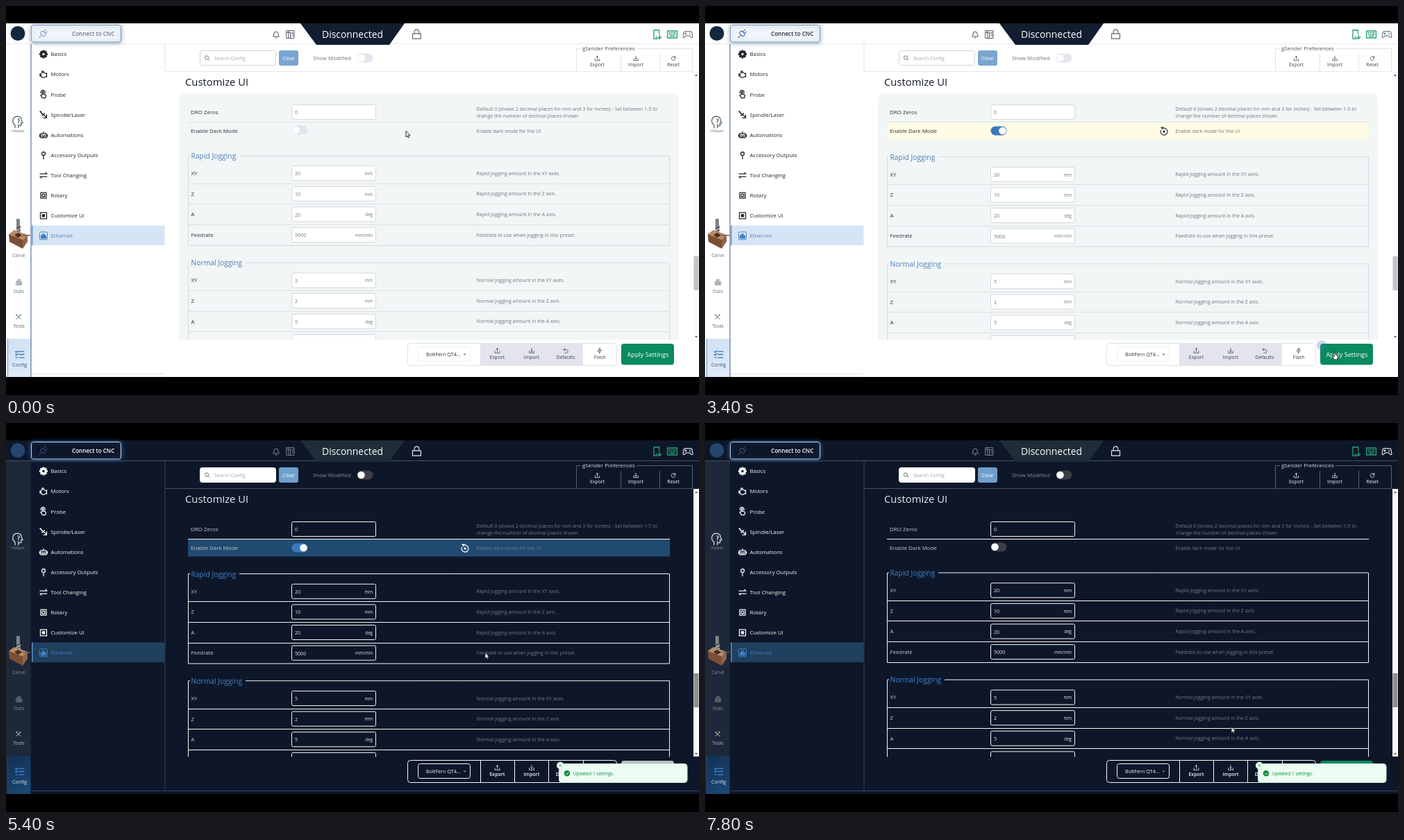
An HTML page with a canvas for the animation above (8 s loop, 998 by 561 pixels).

```html
<!DOCTYPE html>
<html lang="en">
<head>
<meta charset="utf-8">
<title>Settings: dark mode</title>
<style>
html, body { margin: 0; width: 100%; height: 100%; overflow: hidden; background: #000; }
canvas { display: block; }
</style>
</head>
<body>
<canvas id="stage" width="998" height="561"></canvas>
<script>
const ctx = document.getElementById('stage').getContext('2d');
const LOOP = 8000, STEP = 200;
const TOGGLE_ON = 1800, APPLY = 3600, TOGGLE_OFF = 7000;

const LIGHT = {
  bg: '#ffffff', nav: '#ffffff', navLine: '#3d5c8c', line: '#dde1e6', frame: '#d5dbe2', panel: '#f2f6f6',
  text: '#2b3038', side: '#20252c', dim: '#6b7280', help: '#70767e', title: '#111827', legend: '#4a7db8',
  input: '#ffffff', inputLine: '#d3d8df', value: '#6b7280', active: '#d5e5f6', activeText: '#5a83b3',
  row: '#fefce4', trap: '#121d30', off: '#e3e5ee', seg: '#e3e4ed', icon: '#3c4350', logo: '#14283f',
  track: '#fafafa', thumb: '#c3c3c3', connect: '#f0f5fb', connectLine: '#7d9dc2', prefs: '#dfe3e8', config: '#3b74b5'
};
const DARK = {
  bg: '#0e1729', nav: '#1d293a', navLine: '#101a2c', line: '#f4f6f8', frame: '#f4f6f8', panel: '#0e1729',
  text: '#c3c8d0', side: '#f4f6f8', dim: '#868d99', help: '#737a86', title: '#e8ebef', legend: '#3f84cc',
  input: '#0e1729', inputLine: '#f4f6f8', value: '#e8ebef', active: '#20405f', activeText: '#3f7fc4',
  row: '#204a70', trap: '#1e2d37', off: '#3c3e46', seg: '#0e1729', icon: '#f4f6f8', logo: '#24466e',
  track: '#f8f8f8', thumb: '#8f8f8f', connect: '#0e1729', connectLine: '#c4d3e6', prefs: '#566070', config: '#3f84cc'
};

// Icon outlines on a 24 unit grid
const ICONS = {
  bell: 'M6 9a6 6 0 0 1 12 0c0 6 3 7 3 8H3c0-1 3-2 3-8M10 21h4',
  lock: 'M3 11h18v11H3zM7 11V7a5 5 0 0 1 10 0v4',
  map: 'M2 2h20v20H2zM2 7h10M7 2v20M12 7v15M15 6l5 5M20 6l-5 5M16 15h6',
  up: 'M3 14v7h18v-7M12 16V3M8 7l4-4 4 4',
  down: 'M3 14v7h18v-7M12 3v13M8 12l4 4 4-4',
  reset: 'M20 13a8 8 0 1 1-3-7l3 3M20 3v6h-6',
  undo: 'M9 13L4 8l5-5M4 8h10a6 6 0 0 1 0 13h-5',
  bolt: 'M13 2L4 14h7l-1 8 9-12h-7z',
  search: 'M18 10.5a7.5 7.5 0 1 1-15 0a7.5 7.5 0 0 1 15 0M16 16l6 6',
  plug: 'M2 22l5-5M6 12l6 6c4 1 7-2 6-6l-6-6c-4-1-7 2-6 6M14 7l5-5M18 11l4-4',
  swap: 'M2 8h20l-4-4M22 16H2l4 4',
  list: 'M2 5l2 2 4-4M11 5h12M2 12l2 2 4-4M11 12h12M3 20h3M11 20h12',
  tools: 'M4 4l16 16M20 4L4 20M3 7l4-4M17 3l4 4',
  pad: 'M7 5h10a5 5 0 0 1 5 5l1 7c0 3-3 3-4 1l-3-3H8l-3 3c-1 2-4 2-4-1l1-7a5 5 0 0 1 5-5M7 8v4M5 10h4M16 9v1M18 11v1',
  keyboard: 'M1 4h22v16H1zM5 8h2M10 8h2M15 8h4M5 12h2M10 12h2M15 12h4M7 16h10',
  phone: 'M16 10V2H4v20h9M9 18h2M17 13v9M14 19l3 3 4-4',
  head: 'M7 23v-5c-6-4-6-15 4-16c7 0 8 5 8 8l2 4h-3v5h-5v4M12 7c3-1 4 3 1 4v2M13 16v1',
  stats: 'M3 21V11h5v10zM10 21V7h5v14zM17 21v-9h5v9zM6 7l5-4h4l5 4',
  engine: 'M6 7h9l3 3h3v8h-3l-3 3H8l-3-4H2M2 10v7M5 10v5M10 3v4M7 3h6M21 8v12',
  finger: 'M9 12V4a2 2 0 0 1 3 0v7l6 2c2 1 1 6-1 9H9l-5-8zM5 8a6 6 0 1 1 11 0',
  laser: 'M2 3l10 9M12 12l3-4M12 12l-4 3M14 13l7 7M21 12v9h-9M4 2l3 8',
  robot: 'M4 8h16v12H4zM12 8V3M1 11v6M23 11v6M8 13h2M14 13h2M8 17h8',
  pin: 'M17 8a5 5 0 1 1-10 0a5 5 0 0 1 10 0M12 13v10',
  rotate: 'M4 4h5M4 4v5M20 4h-5M20 4v5M4 20h5M4 20v-5M20 20h-5M20 20v-5M16 12a4 4 0 1 1-8 0a4 4 0 0 1 8 0M9 4h6M9 20h6M4 9v6M20 9v6',
  panel: 'M3 3h18v18H3zM8 12h8M12 8v8M9 9l6 6M15 9l-6 6'
};
for (const key in ICONS) ICONS[key] = new Path2D(ICONS[key]);

const MENU = [
  ['Basics', 'gear'], ['Motors', 'engine'], ['Probe', 'finger'], ['Spindle/Laser', 'laser'],
  ['Automations', 'robot'], ['Accessory Outputs', 'pin'], ['Tool Changing', 'swap'],
  ['Rotary', 'rotate'], ['Customize UI', 'panel'], ['Ethernet', 'port']
];

// time, x, y of the pointer tip
const PATH = [
  [0, 576, 180], [200, 590, 190], [800, 907, 499], [1000, 885, 470], [1600, 424, 180], [1800, 424, 180],
  [2200, 535, 214], [2400, 560, 230], [3200, 907, 499], [4800, 907, 499],
  [5400, 690, 331], [5800, 620, 300], [6600, 423, 180], [7000, 423, 180], [7800, 758, 438]
];

function rect(x, y, w, h, fill) {
  ctx.fillStyle = fill;
  ctx.fillRect(x, y, w, h);
}

function box(x, y, w, h, r, fill, stroke, width = 1) {
  ctx.beginPath();
  ctx.roundRect(x, y, w, h, r);
  if (fill) { ctx.fillStyle = fill; ctx.fill(); }
  if (stroke) { ctx.strokeStyle = stroke; ctx.lineWidth = width; ctx.stroke(); }
}

function dot(x, y, r, fill, stroke) {
  box(x - r, y - r, 2 * r, 2 * r, r, fill, stroke, 0.8);
}

function poly(points, fill, stroke, width = 1) {
  ctx.beginPath();
  points.forEach(([x, y]) => ctx.lineTo(x, y));
  ctx.closePath();
  if (fill) { ctx.fillStyle = fill; ctx.fill(); }
  if (stroke) { ctx.strokeStyle = stroke; ctx.lineWidth = width; ctx.stroke(); }
}

// y is the middle of the line of text
function text(str, x, y, size, color, align = 'left', weight = 400) {
  ctx.font = `${weight} ${size}px "Open Sans", "Noto Sans", sans-serif`;
  ctx.textAlign = align;
  ctx.fillStyle = color;
  ctx.fillText(str, x, y + size * 0.36);
}

function icon(name, x, y, size, color, weight = 2) {
  ctx.save();
  ctx.translate(x - size / 2, y - size / 2);
  ctx.scale(size / 24, size / 24);
  ctx.strokeStyle = color;
  ctx.lineWidth = weight;
  ctx.lineJoin = ctx.lineCap = 'round';
  ctx.stroke(ICONS[name]);
  ctx.restore();
}

function gear(x, y, color) {
  ctx.strokeStyle = color;
  ctx.lineWidth = 3;
  ctx.beginPath();
  ctx.arc(x, y, 3.3, 0, 7);
  ctx.stroke();
  for (let i = 0; i < 8; i++) {
    const a = i * Math.PI / 4;
    ctx.beginPath();
    ctx.moveTo(x + 4 * Math.cos(a), y + 4 * Math.sin(a));
    ctx.lineTo(x + 6 * Math.cos(a), y + 6 * Math.sin(a));
    ctx.stroke();
  }
}

function port(x, y, c) {
  box(x - 5.5, y - 5.5, 11, 11, 1.5, null, c.activeText);
  poly([[-4, 4], [-4, -1], [-2, -1], [-2, -3], [2, -3], [2, -1], [4, -1], [4, 4]]
    .map(([a, b]) => [x + a, y + b]), '#3f7fc4');
}

function toggle(x, y, on, c) {
  box(x - 11.5, y - 6.5, 23, 13, 6.5, on ? '#3b78bf' : c.off);
  dot(x + (on ? 5.5 : -5.5), y, 5.3, '#ffffff');
}

function header(c, t, dark) {
  rect(0, 25, 998, 30, c.bg);
  rect(0, 54, 998, 1, dark ? '#465164' : '#e6e9ee');
  dot(17, 39.5, 10.5, c.logo);

  ctx.save();
  ctx.shadowColor = dark ? (t > APPLY ? 'rgba(55,125,200,.75)' : 'transparent') : 'rgba(60,90,130,.5)';
  ctx.shadowBlur = 6;
  ctx.shadowOffsetY = dark ? 0 : 1;
  box(36.5, 27.5, 129, 24.5, 3, c.connect, c.connectLine);
  ctx.restore();

  ctx.save();
  const pulse = 0.775 - 0.225 * Math.cos((t - 100) / 1000 * Math.PI);
  ctx.globalAlpha = dark ? 0.6 : pulse;
  icon('plug', 53.5, 40, 14, dark ? '#3f6ea8' : '#2f5f9c', 1.9);
  ctx.globalAlpha = dark ? 1 : pulse;
  text('Connect to CNC', 95, 40, 8.15, dark ? '#ffffff' : '#101826', 'left', 600);
  ctx.restore();

  icon('bell', 389, 41.5, 12, dark ? '#868d99' : c.icon, 1.8);
  icon('map', 409.5, 41, 13, dark ? '#868d99' : c.icon, 1.6);
  poly([[424, 25], [574, 25], [552, 56], [447, 56]], c.trap);
  text('Disconnected', 499, 40.5, 13.9, '#ffffff', 'center');
  icon('lock', 591.5, 40.5, 16, dark ? '#e8ebef' : '#60666f', 1.7);
  icon('phone', 938, 41, 15, '#27a077', 2.2);
  icon('keyboard', 959.5, 41, 15, '#27a077', 2.2);
  icon('pad', 982, 41, 15, dark ? '#d5d9df' : '#7b828c', 2);
}

function carve() {
  poly([[15, 307], [20, 307], [20, 320], [15, 320]], '#7f8287');
  poly([[15, 320], [21, 317], [21, 330], [18, 334], [15, 330]], '#55595f');
  for (let y = 320; y < 331; y += 4) poly([[15, y + 3], [21, y], [21, y + 1.4], [15, y + 4.4]], '#d0d3d6');
  poly([[4, 329], [12, 323], [31, 330], [24, 337]], '#b98b67');
  poly([[4, 329], [24, 337], [24, 350], [5, 340]], '#7a4f36');
  poly([[24, 337], [31, 330], [31, 340], [24, 350]], '#936345');
  poly([[12, 330], [18, 327], [23, 331], [17, 334]], '#4a2d20');
  rect(24, 330, 11, 1.5, '#6d625a');
}

function navigation(c, dark) {
  rect(0, 55, 36, 480, c.nav);
  const tile = ctx.createLinearGradient(0, 480, 36, 535);
  tile.addColorStop(0, dark ? '#123052' : '#cfe0f3');
  tile.addColorStop(1, dark ? '#1c4a78' : '#dfebf8');
  rect(3, 480, 33, 55, tile);
  rect(2, 480, 1, 55, dark ? '#204a76' : '#6c96c4');
  rect(35.5, 55, 1, 480, c.navLine);

  icon('head', 17, 167, 19, dark ? '#d8dce2' : '#596069', 1.6);
  text('Helper', 17.5, 180, 6.1, c.dim, 'center');
  carve();
  text('Carve', 18.5, 359, 7, c.dim, 'center');
  icon('stats', 18.5, 398, 10, c.dim, 2);
  text('Stats', 18.5, 411.5, 6.7, c.dim, 'center');
  icon('tools', 18, 448.5, 9, dark ? '#e0e3e8' : '#40464f', 2.4);
  text('Tools', 18.5, 462, 6.9, dark ? '#b8bec8' : '#596069', 'center');
  icon('list', 19.5, 502.5, 14, c.config, 2.4);
  text('Config', 19.5, 517, 7.1, dark ? '#dfe6ee' : '#35537a', 'center');
}

function menu(c, dark) {
  rect(37, 55, 192, 480, c.bg);
  rect(37, 316.5, 191.5, 28.5, c.active);
  rect(37, 316.5, 1.5, 28.5, dark ? '#5b8fc6' : '#6c96c4');
  MENU.forEach(([label, name], i) => {
    const y = 69.5 + i * 29.1;
    if (name === 'gear') gear(54, y, c.side);
    else if (name === 'port') port(54, y, c);
    else icon(name, 54, y, 12, c.side, 2.6);
    text(label, 64.5, y, 7.85, name === 'port' ? c.activeText : c.side);
  });
  rect(228.5, 55, 1, dark ? 476 : 40, dark ? '#33405a' : '#e0e4e9');
  rect(37, 530, dark ? 961 : 191, 1, dark ? '#33405a' : '#dfe3e8');
}

function tools(c, dark) {
  rect(229, 94, 761, 1, dark ? '#465164' : '#e3e6eb');
  box(279.5, 64.5, 109, 21, 3, '#ffffff', dark ? '#ffffff' : '#cfd5dd');
  icon('search', 289.5, 75, 8.5, '#5c636d', 2.4);
  text('Search Config', 300, 75, 7, '#a0a6af');
  box(393, 64, 28, 22, 3, dark ? '#6f9fcd' : '#7ba5d1');
  text('Clear', 407, 75, 7.2, '#ffffff', 'center', 500);
  text('Show Modified', 442, 75, 7.92, c.dim);
  toggle(517, 75, false, c);

  ctx.strokeStyle = c.prefs;
  ctx.lineWidth = 1;
  ctx.beginPath();
  ctx.moveTo(828, 61.5);
  ctx.lineTo(821.5, 61.5);
  ctx.lineTo(821.5, 94);
  ctx.moveTo(908, 61.5);
  ctx.lineTo(988.5, 61.5);
  ctx.lineTo(988.5, 94);
  for (const x of [885.5, 941.5]) { ctx.moveTo(x, 69); ctx.lineTo(x, 94); }
  ctx.stroke();
  text('gSender Preferences', 830, 61.5, 7.85, dark ? '#d5d9df' : '#4b525c');
  [['Export', 'up', 851.5], ['Import', 'down', 907], ['Reset', 'reset', 961]].forEach(([label, name, x]) => {
    icon(name, x, 75.5, 8.5, c.icon, 2.2);
    text(label, x, 85, 6.9, c.icon, 'center', 500);
  });
}

function field(y, value, unit, c) {
  box(411.5, y - 10.5, 121, 21, 2, c.input, c.inputLine);
  text(value, 416, y + 0.5, 7.1, c.value);
  if (unit) text(unit, 528, y + 0.5, 6.2, c.value, 'right');
}

function jogging(name, top, values, c) {
  const gap = 29.6, legendWidth = name === 'Rapid' ? 71 : 80;
  const bottom = top + 129.5;
  ctx.strokeStyle = c.frame;
  ctx.lineWidth = 1;
  ctx.beginPath();
  ctx.moveTo(265, top);
  ctx.lineTo(262.5, top);
  ctx.lineTo(262.5, bottom);
  ctx.lineTo(955.5, bottom);
  ctx.lineTo(955.5, top);
  ctx.lineTo(265 + legendWidth, top);
  ctx.stroke();
  text(name + ' Jogging', 266.5, top + 0.3, 10.3, c.legend);
  ['XY', 'Z', 'A', 'Feedrate'].forEach((axis, i) => {
    const y = top + 25.3 + i * gap;
    text(axis, 266.5, y, 7.85, c.text);
    field(y, values[i], ['mm', 'mm', 'deg', 'mm/min'][i], c);
    const help = i < 3
      ? `${name} jogging amount in the ${axis} ${i ? 'axis' : 'axes'}.`
      : 'Feedrate to use when jogging in this preset.';
    text(help, 677.5, y, 7.05, c.help);
    if (i < 3) rect(262.5, Math.round(y + 14.5), 693, 1, c.line);
  });
}

function content(c, on, dark) {
  ctx.save();
  ctx.beginPath();
  ctx.rect(229, 95, 769, 386.5);
  ctx.clip();
  text('Customize UI', 258, 109.5, 14.8, c.title);
  box(249, 126, 720, 400, 8, c.panel);

  text('DRO Zeros', 266, 153.5, 7.95, c.text);
  field(153, '0', '', c);
  text('Default 0 (shows 2 decimal places for mm and 3 for inches) - Set between 1-5 to', 677.5, 148, 7.05, c.help);
  text('change the number of decimal places shown', 677.5, 158.5, 7.05, c.help);

  if (on) rect(262, 168, 694, 24.5, c.row);
  rect(262, 167, 694, 1, c.line);
  text('Enable Dark Mode', 266, 180.5, 7.93, c.text);
  toggle(423, on ? 180 : 178.8, on, c);
  if (on) {
    ctx.strokeStyle = c.icon;
    ctx.lineWidth = 1.3;
    ctx.beginPath();
    ctx.arc(661, 181, 5, -2, 3.6);
    ctx.stroke();
    poly([[656, 175], [660.5, 174], [659, 178.5]], c.icon);
    dot(661, 181, 1.8, c.icon);
  }
  text('Enable dark mode for the UI', 677.5, 180.3, 7.05, c.help);

  const shift = on ? 1.5 : 0;
  jogging('Rapid', 216 + shift, ['20', '10', '20', '5000'], c);
  jogging('Normal', 370.3 + shift, ['5', '2', '5', '3000'], c);
  ctx.restore();

  rect(990, 95, 8, 386, c.track);
  rect(990.5, 361, 7, 49, c.thumb);
  poly([[992, 101], [994, 98.5], [996, 101]], '#555');
  poly([[992, 476], [994, 478.5], [996, 476]], '#555');
}

function footer(c, t, dark) {
  const edge = dark ? '#f4f6f8' : '#dfe3e8';
  box(578.5, 486.5, 301, 32, 4, c.bg);
  rect(683, 487, 148, 31, c.seg);
  box(578.5, 486.5, 301, 32, 4, null, edge);
  if (dark) for (const x of [683, 732, 781, 831]) rect(x, 487, 1, 31, edge);
  box(593.5, 491.5, 75, 21, 3, c.bg, dark ? edge : '#eceef2');
  text('BoltFern QT4...', 605, 502.5, 7.2, dark ? '#f4f6f8' : '#2b3038', 'left', 500);
  poly([[658.5, 501.5], [662.5, 501.5], [660.5, 503.8]], c.dim);
  [['Export', 'up', 707.5], ['Import', 'down', 757], ['Defaults', 'undo', 806], ['Flash', 'bolt', 855]]
    .forEach(([label, name, x]) => {
      icon(name, x, 497, 9, c.icon, 2.1);
      text(label, x, 506.5, 7, c.icon, 'center', dark ? 600 : 500);
    });

  const enabled = canApply(t);
  box(886, 487, 76, 30.5, 4, enabled ? '#0a8a5d' : '#b9bdc4');
  text('Apply Settings', 924.5, 502.5, 9.1, enabled ? '#ffffff' : '#858a91', 'center');
  if (enabled && t >= TOGGLE_ON) {
    const phase = Math.min(1, ((t + 850) % 1000) / 750);
    const ease = 1 - (1 - phase) ** 3;
    ctx.globalAlpha = 1 - ease;
    dot(888, 489.5, 4.6 + 3.4 * ease, '#3b7cc2');
    ctx.globalAlpha = 1;
  }
}

function toast(t) {
  if (t < APPLY) return;
  const u = Math.min(1, 0.1 + (t - APPLY) / 400);
  const k = u * u * (3 - 2 * u);
  ctx.save();
  ctx.beginPath();
  ctx.rect(0, 25, 998, 510);
  ctx.clip();
  ctx.globalAlpha = u;
  ctx.translate(0, 27 * (1 - k));
  box(796.5, 491.5, 184.5, 27, 4, '#ecfdf3', '#c9f7dc');
  dot(808, 505.3, 4.2, '#0a8a3a');
  ctx.strokeStyle = '#ffffff';
  ctx.lineWidth = 1;
  ctx.beginPath();
  ctx.moveTo(806, 505.4);
  ctx.lineTo(807.5, 507);
  ctx.lineTo(810.2, 503.8);
  ctx.stroke();
  text('Updated 1 settings.', 817, 505.5, 6.5, '#0a8a3a', 'left', 500);
  dot(798.3, 494, 5, '#ecfdf3', '#bdeed0');
  ctx.strokeStyle = '#0a8a3a';
  ctx.lineWidth = 0.8;
  ctx.beginPath();
  ctx.moveTo(796.8, 492.5);
  ctx.lineTo(799.8, 495.5);
  ctx.moveTo(799.8, 492.5);
  ctx.lineTo(796.8, 495.5);
  ctx.stroke();
  ctx.restore();
}

const canApply = t => t < APPLY || t >= TOGGLE_OFF;

function pointerAt(t) {
  let i = 0;
  while (i < PATH.length - 2 && PATH[i + 1][0] <= t) i++;
  const [t0, x0, y0] = PATH[i], [t1, x1, y1] = PATH[i + 1];
  const u = Math.min(1, (t - t0) / (t1 - t0));
  const k = u * u * (3 - 2 * u);
  return [x0 + (x1 - x0) * k, y0 + (y1 - y0) * k];
}

function pointer(t) {
  const [x, y] = pointerAt(t);
  const overToggle = Math.abs(x - 423) < 12 && Math.abs(y - 180) < 7;
  const overApply = canApply(t) && x > 886 && x < 962 && y > 487 && y < 518;
  const shape = overToggle || overApply
    ? [[-1, 0], [1, 0], [1, 4], [4.5, 5], [4.5, 8], [3.5, 11], [-1, 11], [-3.5, 7], [-2.5, 6], [-1, 7]]
    : [[0, 0], [0, 9], [2, 7.2], [3.3, 10], [4.6, 9.4], [3.4, 6.7], [6, 6.5]];
  poly(shape.map(([a, b]) => [x + a, y + b]), '#ffffff', '#15181d', 0.9);
}

function draw(t) {
  const dark = t >= APPLY;
  const on = t >= TOGGLE_ON && t < TOGGLE_OFF;
  const c = dark ? DARK : LIGHT;
  rect(0, 0, 998, 561, '#000');
  rect(0, 25, 998, 510, c.bg);
  navigation(c, dark);
  menu(c, dark);
  tools(c, dark);
  content(c, on, dark);
  footer(c, t, dark);
  header(c, t, dark);
  toast(t);
  pointer(t);
}

const start = performance.now();
function tick() {
  const t = (performance.now() - start) % LOOP;
  draw(Math.floor(t / STEP) * STEP);
  requestAnimationFrame(tick);
}
tick();
</script>
</body>
</html>
```
